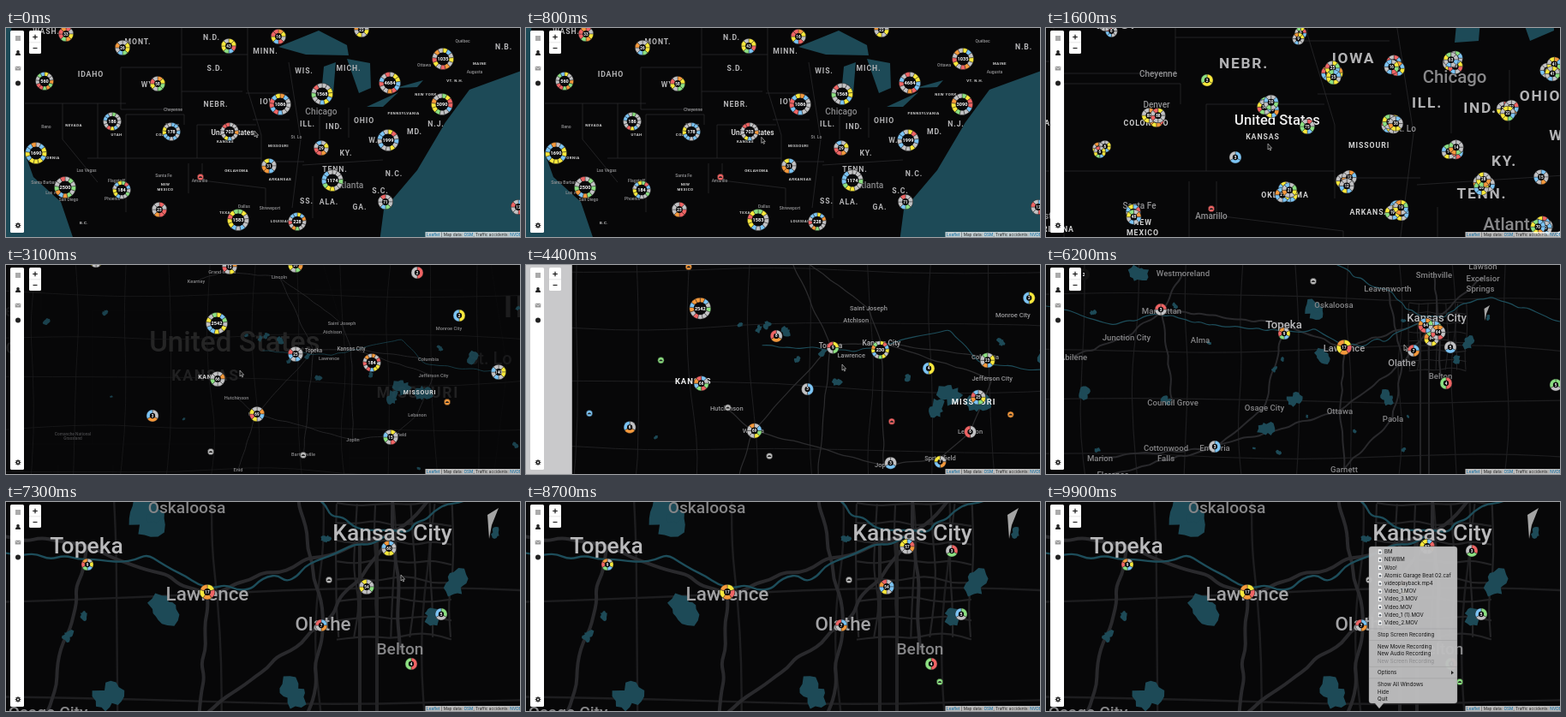
An HTML page for the animation above (10 s loop, 600 by 244 pixels).

```html
<!DOCTYPE html>
<html lang="en">
<head>
<meta charset="utf-8">
<title>Accident map zoom</title>
<style>
  html, body { margin: 0; width: 100%; height: 100%; overflow: hidden; background: #070708; }
  svg { display: block; width: 100vw; height: 100vh; }
  text { font-family: Roboto, "Open Sans", sans-serif; font-weight: 500; }
  .label, .count { text-anchor: middle; dominant-baseline: central; }
  .caps { font-weight: 700; letter-spacing: .1em; }
  .border { fill: none; stroke: #29292b; stroke-width: .8; vector-effect: non-scaling-stroke; }
  .water { fill: #1d4a57; }
  .line { fill: none; stroke-linejoin: round; stroke-linecap: round; }
  .count { fill: #fff; font-weight: 700; }
  .ui text { font-family: Inter, "Liberation Sans", sans-serif; font-weight: 400; }
</style>
</head>
<body>
<svg id="stage" viewBox="0 0 600 244" preserveAspectRatio="none"></svg>
<script>
const LOOP = 10000, ZOOM_MS = 250;
const stage = document.getElementById('stage');
const zooms = [
  { t: 1230, x: 259, y: 137 }, { t: 2630, x: 273, y: 125 }, { t: 4353, x: 369, y: 118 },
  { t: 5730, x: 418, y: 95 }, { t: 6930, x: 461, y: 87 }
];
const palette = { g: '#c2c2c4', r: '#ef6464', o: '#f5993c', y: '#f8e83c', n: '#8ce082', b: '#7cc4f4', k: '#bbb' };
const riverColor = '#1d4d5a';

function el(parent, name, attrs = {}, text) {
  const node = document.createElementNS('http://www.w3.org/2000/svg', name);
  for (const key in attrs) node.setAttribute(key, attrs[key]);
  if (text !== undefined) node.textContent = text;
  parent.appendChild(node);
  return node;
}
const clamp = v => Math.max(0, Math.min(1, v));
const fade = (t, start, ms) => clamp((t - start) / ms);
const rows = list => list.trim().split('|').map(row => row.trim().split(' '));
const range = n => Array.from({ length: n }, (_, i) => i);
function seeded(seed) {
  return () => {
    seed = (seed * 1664525 + 1013904223) >>> 0;
    return seed / 4294967296;
  };
}

// Camera: every zoom doubles the scale around the pointer
function camera(progress) {
  let k = 1, x = 0, y = 0;
  zooms.forEach((z, i) => {
    const s = 1 + progress(z, i);
    k *= s;
    x = z.x + (x - z.x) * s;
    y = z.y + (y - z.y) * s;
  });
  return { k, x, y };
}
const levels = range(6).map(n => camera((z, i) => i < n ? 1 : 0));
function viewFrom(cam, level) {
  const base = levels[level], k = cam.k / base.k;
  return { k, x: cam.x - k * base.x, y: cam.y - k * base.y };
}

// A map layer has its ground below and its place names on top
function makeLayer(level) {
  const root = el(stage, 'g');
  return { level, root, ground: el(root, 'g'), names: el(root, 'g'), places: {} };
}
function labels(layer, size, fill, list, caps) {
  for (const [x, y, ...words] of rows(list)) {
    const name = words.join(' ');
    layer.places[name] = [+x, +y];
    el(layer.names, 'text', { x, y, fill, 'font-size': size, class: caps ? 'label caps' : 'label' }, name);
  }
}
function drawLine(layer, points, stroke, width) {
  const middle = points.slice(1, -1).map((p, i) => {
    const next = points[i + 2];
    return `Q${p} ${(p[0] + next[0]) / 2},${(p[1] + next[1]) / 2}`;
  });
  const d = `M${points[0]}${middle.join('')}L${points[points.length - 1]}`;
  el(layer.ground, 'path', { d, class: 'line', stroke, 'stroke-width': width });
}
// Splits each leg of a line and sways the new points sideways
function meander(points, sway, seed) {
  const rnd = seeded(seed), out = [];
  points.slice(1).forEach((b, i) => {
    const a = points[i], length = Math.hypot(b[0] - a[0], b[1] - a[1]), parts = Math.ceil(length / 9);
    for (let n = 0; n < parts; n++) {
      const p = n / parts, side = n ? (rnd() - .5) * 2 * sway : 0;
      out.push([a[0] + (b[0] - a[0]) * p - (b[1] - a[1]) / length * side, a[1] + (b[1] - a[1]) * p + (b[0] - a[0]) / length * side]);
    }
  });
  return [...out, points[points.length - 1]];
}
function river(layer, width, list) {
  const points = list.split(' ').map(p => p.split(',').map(Number));
  drawLine(layer, meander(points, width * 2, points.length), riverColor, width);
}
function highways(layer, width, color, list) {
  list.split('|').forEach((route, i) => {
    const stops = route.trim().split(' > ').map(name => layer.places[name]);
    drawLine(layer, meander(stops, width, i + 9), color, width);
  });
}
function roadGrid(layer, { x, y, w, h, step, jitter, width, color }) {
  const rnd = seeded(step * 31), wobble = () => (rnd() - .5) * 2 * jitter;
  for (let a = 0; a <= w; a += step) {
    drawLine(layer, range(5).map(i => [x + a + wobble(), y + h * i / 4]), color, width);
  }
  for (let a = 0; a <= h; a += step) {
    drawLine(layer, range(7).map(i => [x + w * i / 6, y + a + wobble()]), color, width);
  }
}
function lake(layer, x, y, size, rnd) {
  const lean = rnd() * Math.PI;
  const points = range(18).map(i => {
    const a = i / 18 * Math.PI * 2, r = size * (.3 + .45 * Math.abs(Math.cos(a - lean)) + rnd() * .4);
    return `${(x + Math.cos(a) * r).toFixed(1)},${(y + Math.sin(a) * r).toFixed(1)}`;
  });
  el(layer.ground, 'polygon', { points: points.join(' '), class: 'water' });
}
function lakes(layer, main, specks, seed) {
  const rnd = seeded(seed);
  rows(main).forEach(([x, y, size]) => lake(layer, +x, +y, +size, rnd));
  range(specks).forEach(() => lake(layer, rnd() * 600, 40 + rnd() * 200, 1.5 + rnd() * 3, rnd));
}

el(stage, 'rect', { width: 600, height: 244, fill: '#070708' });
const country = makeLayer(0), region = makeLayer(2), metro = makeLayer(4);

// Country: oceans, great lakes, state borders
[
  'M-40,-10H6L9,110L32,174L64,203L80,250H-40Z',
  'M640,36L541,72L513,110L480,166L441,212L436,250H640Z',
  'M318,22L365,3L398,20L400,32L350,31Z',
  'M371,45L385,40L382,76L368,77Z',
  'M398,36L425,41L426,70L412,76Z',
  'M421,92L458,75L440,92Z M455,70L487,61L480,69Z'
].forEach(d => el(country.ground, 'path', { d, class: 'water' }));
el(country.ground, 'path', { class: 'border', d:
  'M22,88H140M95,152H298M140,101V215M223,113V152M223,113H292M140,101H208V113M134,46H205V95H134ZM205,0V46' +
  'M205,31H282M205,74H276M107,88V152M66,88V130L107,180M298,125V168M298,156H348M213,158V193M229,158V178L303,187V210' +
  'M282,0V72L298,125M280,76H330M288,107H331M330,40L344,130L334,210M366,96V130M400,93V128M346,160L440,154M358,173V222' });
labels(country, 8.7, '#b3b3b5', `47 4 WASH.|154 16 MONT.|240 11 N.D.|244 47 S.D.|303 27 MINN.|348 50 WIS.|400 47 MICH.
  |99 54 IDAHO|170 66 WYO.|245 89 NEBR.|309 86 IOWA|352 112 ILL.|383 115 IND.|418 108 OHIO|397 146 KY.|384 165 TENN.
  |437 131 W.VA.|477 121 MD.|502 112 N.J.|453 170 N.C.|437 190 S.C.|413 209 GA.|377 203 ALA.|351 202 SS.|581 22 N.B.`, true);
labels(country, 4.4, '#d0d0d0', `79 113 NEVADA|129 124 UTAH|48 151 CALIFORNIA|188 124 COLORADO|256 132 KANSAS|318 137 MISSOURI
  |269 166 OKLAHOMA|320 176 ARKANSAS|186 182 NEW|186 188 MEXICO|257 215 TEXAS|322 225 LOUISIANA|91 227 B.C.
  |490 77 NEW YORK|553 41 MAINE|524 61 VT. N.H.|464 99 PENNSYLVANIA|135 186 ARIZONA`, true);
labels(country, 5, '#929294', `47 115 Reno|94 166 Las Vegas|45 180 Santa Barbara|60 192 Los Angeles|73 200 San Diego|129 178 Flagstaff
  |124 199 Phoenix|184 172 Santa Fe|226 178 Amarillo|278 208 Dallas|308 210 Shreveport|195 95 Cheyenne|194 113 Denver
  |339 127 St. Lo|533 15 Québec|488 43 Ottawa|547 51 Augusta`);
labels(country, 10.2, '#88888a', '368 97 Chicago|401 183 Atlanta');
labels(country, 8.3, '#f0f0f0', '264.5 122 United States');

// Region
labels(region, 5.6, '#98989a', `222 19 Kearney|252 8 Grand Island|319 14 Lincoln|392 68 Saint Joseph|381 78 Atchison|377 109 Lawrence
  |517 74 Monroe City|493 110 Columbia|499 129 Jefferson City|480 175 Lebanon|405 204 Joplin|269 155 Hutchinson|292 174 Wichita
  |347 221 Bartlesville|271 239 Enid|454 198 Springfield`);
labels(region, 6.3, '#b0b0b2', '359 100 Topeka|403 98 Kansas City');
labels(region, 4.8, '#505052', '78 197 Comanche National|78 202 Grassland');
labels(region, 7, '#f0f0f0', '240 131 KANSAS|483 149 MISSOURI', true);
roadGrid(region, { x: -20, y: -20, w: 660, h: 290, step: 52, jitter: 7, width: .7, color: '#202022' });
highways(region, .9, '#2c2c2e', `Kearney > Grand Island > Lincoln > Saint Joseph > Kansas City > Joplin|Topeka > Kansas City > Columbia
  |Kansas City > Jefferson City > Lebanon > Springfield > Joplin > Wichita > Hutchinson|Topeka > Wichita > Enid|Lincoln > Topeka > Bartlesville`);
river(region, .8, '300,100 338,102 380,106 403,99 462,86 490,116 575,125');
lakes(region, '320 88 5|352 106 4|462 143 12|487 150 12|450 155 9|545 108 8|365 132 5', 14, 8);
const blank = el(region.root, 'rect', { x: -400, y: -300, width: 535, height: 900, fill: '#c9c9cb' });

// Metro
labels(metro, 13.2, '#b9b9bb', '277.5 69 Topeka|456 61.5 Kansas City');
labels(metro, 11.2, '#a3a3a5', '348 97 Lawrence|415.5 114.5 Olathe');
labels(metro, 9.6, '#858587', `135 53 Manhattan|94 84 Junction City|180 87 Alma|160 9 Westmoreland|336 46.5 Oskaloosa|399 27 Leavenworth
  |453 11 Smithville|510 1 Lawson|510 15 Excelsior|507 27 Springs|32 107 Abilene|148 160 Council Grove|255 166 Osage City
  |343 170 Ottawa|405 179 Paola|460.5 129 Belton|197 213 Emporia|63 225 Marion|140 213 Cottonwood|140 225 Falls|348 238 Garnett|78 244 Florence`);
roadGrid(metro, { x: -20, y: -25, w: 660, h: 290, step: 62, jitter: 6, width: 1.2, color: '#1d1d1f' });
roadGrid(metro, { x: 424, y: 45, w: 66, h: 77, step: 11, jitter: 2, width: 1.1, color: '#232325' });
highways(metro, 2, '#29292c', `Abilene > Junction City > Manhattan > Topeka > Lawrence > Kansas City|Topeka > Osage City > Emporia > Florence
  |Kansas City > Olathe > Ottawa > Emporia > Marion|Kansas City > Belton|Olathe > Paola > Garnett|Lawrence > Ottawa > Garnett
  |Smithville > Kansas City > Excelsior|Westmoreland > Manhattan > Council Grove|Leavenworth > Olathe`);
for (const x of [437, 447]) drawLine(metro, [[x, 65], [x, 250]], '#232325', 2);
river(metro, 1.2, '0,48 80,70 130,57 205,72 290,78 313,74 351,94 374,94 383,87 394,90 411,78 451,64');
river(metro, 1.2, '340,0 380,25 405,32 420,52 447,60 466,61 480,49 520,37 600,66');
lakes(metro, '313 53 14|323 106 11|290 157 10|398 155 10|493 91 9|258 191 11|108 10 13|45 150 9|140 158 7|479 110 6', 16, 21);
el(metro.ground, 'path', { d: 'M511.5,51L518,47L514,57L512.5,65Z', fill: '#a5a5a5' });

// Cluster markers: the size follows the count, a zero count is a plain dot
const markerLayer = el(stage, 'g');
function radiusFor(count) {
  if (count >= 1000) return 12.5;
  if (count >= 150) return 10.5;
  return count >= 10 ? 8.7 : count ? 7 : 3.7;
}
function drawMarker(parent, count, colors, rnd) {
  const g = el(parent, 'g'), r = radiusFor(count);
  if (!count) {
    el(g, 'circle', { r, fill: palette[colors], stroke: '#111', 'stroke-width': .5 });
    el(g, 'path', { d: 'M-2.4,1L-1,-.8H1L2.4,1Z', fill: '#222' });
    return g;
  }
  const keys = colors || range(r > 9 ? 13 : 8).map(() => 'gggyobrnggby'[Math.floor(rnd() * 12)]).join('');
  const at = n => {
    const a = n / keys.length * Math.PI * 2 - Math.PI / 2;
    return [r * Math.cos(a), r * Math.sin(a)];
  };
  el(g, 'circle', { r, fill: '#111' });
  [...keys].forEach((key, i) =>
    el(g, 'path', { d: `M0,0L${at(i)}A${r},${r} 0 0 1 ${at(i + 1)}Z`, fill: palette[key], stroke: '#222', 'stroke-width': .4 }));
  el(g, 'circle', { r: r * (r > 9 ? .6 : .45), fill: '#09090b' });
  el(g, 'text', { class: 'count', 'font-size': r > 9 ? 5.6 : 4.6 }, count);
  return g;
}
// Rows: x y count [colors]; a count such as 25*3 is a cluster splitting in three
function markerSet(level, from, to, list) {
  const group = el(markerLayer, 'g'), rnd = seeded(level * 991 + from), items = [];
  for (const [x, y, amount, colors] of rows(list)) {
    const [count, copies = 1] = amount.split('*').map(Number), turn = rnd() * 6.3;
    range(copies).forEach(i => {
      const reach = copies > 1 ? 2 + rnd() * 5 : 0;
      items.push({ x: +x, y: +y, dx: Math.cos(turn + i * 2.4) * reach, dy: Math.sin(turn + i * 2.4) * reach,
        node: drawMarker(group, count, colors, rnd) });
    });
  }
  return { level, from, to, group, items };
}
const plains = '246 68 2542|247 133 66|293 174 69|515 160 0 o|';
const suburbs = '278 80 9 gybnro|348 96 17 yroyo|467 138 4 rn|';
const kansasSide = suburbs + '414.5 115.5 7 bogr|484.5 109 5 ngb|441 93 54|419 89 0 k|';
const markerSets = [
  markerSet(0, 0, 1480, `45 62 560|70 7 33|136 23 26|177 65 58|124 109 186|193 121 178|35 146 1690|69 186 2500|135 189 184|179 212 23
    |261 121 703|227 174 0 r|260 21 43|318 10 16|415 2 22|320 89 1086|369 77 1568|448 64 4684|510 36 1035|509 89 3090|446 131 1999
    |368 140 29|307 161 31|381 178 1174|443 203 71|271 224 1583|340 226 228|598 209 12`),
  markerSet(1, 1480, 2880, `75 0 8*2|295 8 9*2|333 51 25*4|407 45 16*3|476 39 63*4|590 48 41*4|188 61 2 yyn|127 104 88*3|64 141 6*3
    |258 92 30*4|305 115 75|221 151 3 bbg|405 112 38*5|540 95 22*4|476 143 14*3|511 183 28*4|578 174 15|351 178 12*3|282 193 21*4
    |101 218 48*2|193 211 0 r|411 214 19*4|580 232 70*5`),
  markerSet(2, 2880, 3300, plains + `105 -4 5|261 2 12|338 0 31|480 9 2 rg|529 59 2 yb|338 104 25|427 114 184|575 125 140
    |171 176 3 gob|449 201 15|239 218 0 k|347 222 0 k`),
  markerSet(2, 3300, 5980, plains + `236 32 0 o|312 92 8 gor|361 102 9 yngr|402 104 230|531 59 2 yb|444 120 4 yb|495 113 23|212 113 0 n
    |270 154 0 k|150 159 0 b|185 171 6 gob|339 138 3 bg|487 145 25|412 166 0 r|480 175 6 gr|411 202 3 gbg|454 201 7 goby|306 196 0 k`),
  markerSet(4, 5980, 7180, suburbs + '44 11 2 o|134 52 3 rggr|429 100 7 bogr|472 96 5 gbg|450 78 64*4|197 212 3 bg|595 140 5 ngn|312 19 0 k'),
  markerSet(4, 7180, 7500, kansasSide + '454 70.5 60'),
  markerSet(4, 7500, LOOP, kansasSide + '453 69.5 57|479 72 3 rng|472 148.5 0 n')
];

// Interface
const ui = el(stage, 'g', { class: 'ui' });
const box = (x, y, width, height, fill, rx = 0) => el(ui, 'rect', { x, y, width, height, fill, rx });
const stroke = (parent, d, color, width) => el(parent, 'path', { d, fill: 'none', stroke: color, 'stroke-width': width });
const disc = (cy, r) => el(ui, 'circle', { cx: 14, cy, r, fill: '#222' });
box(5, 3, 16, 236, '#fff', 1.5);
stroke(ui, 'M11,10H17M11,12H17M11,14H17', '#444', .9);
el(ui, 'path', { d: 'M11,32Q11,28.5 14,29Q17,28.5 17,32Z', fill: '#222' });
disc(27.8, 1.8);
box(10.7, 44.8, 6.6, 4.8, '#999', .6);
stroke(ui, 'M11,45.5L14,47.6L17,45.5', '#fff', .6);
disc(64.5, 3);
range(8).forEach(i => el(ui, 'rect', { x: 13.4, y: 227.2, width: 1.2, height: 2, fill: '#222', transform: `rotate(${i * 45} 14 230.5)` }));
disc(230.5, 2.4);
disc(230.5, 1).setAttribute('fill', '#fff');
box(27, 3, 14, 27, '#fff', 1.5);
stroke(ui, 'M27,16.8H41', '#ccc', .5);
stroke(ui, 'M31.2,10.5H36.8M34,7.7V13.3M31.5,23.5H36.5', '#111', 1.2);
box(489.5, 238, 110.5, 6, 'rgba(255,255,255,.72)');
const credit = el(ui, 'text', { x: 491, y: 242.8, 'font-size': 4.75 });
['Leaflet', ' | Map data: ', 'OSM', ', Traffic accidents: ', 'NVDB'].forEach((text, i) =>
  el(credit, 'tspan', { fill: i % 2 ? '#222' : '#0066a0' }, text));

// Dock menu: files, then command groups split by rules
const menu = el(ui, 'g');
el(menu, 'path', { d: 'M380,52H477Q480,52 480,55V232Q480,235 477,235H394L389,241L384,235H380Q377,235 377,232V55Q377,52 380,52Z',
  fill: '#bfbfc0', 'fill-opacity': .96, stroke: '#888', 'stroke-width': .4 });
const files = ['BM', 'NEWBM', 'Woo!', 'Atomic Garage Beat 02.caf', 'videoplayback.mp4', 'Video_1.MOV', 'Video_3.MOV', 'Video.MOV', 'Video_1 (1).MOV', 'Video_2.MOV'];
const commands = [['Stop Screen Recording'], ['New Movie Recording', 'New Audio Recording', 'New Screen Recording'],
  ['Options'], ['Show All Windows', 'Hide', 'Quit']];
let menuY = 58;
function menuRow(x, text, step) {
  const fill = text === 'New Screen Recording' ? '#8c8c8e' : '#111';
  el(menu, 'text', { x, y: menuY + 2.2, 'font-size': 6.1, fill }, text);
  if (text === 'Options') el(menu, 'path', { d: `M473,${menuY - 2.2}l3,2.2l-3,2.2Z`, fill: '#222' });
  menuY += step;
}
files.forEach(name => {
  el(menu, 'path', { d: `M387.5,${menuY - 3}h3.2l1.6,1.6v4.6h-4.8Z`, fill: '#f5f5f5', stroke: '#888', 'stroke-width': .3 });
  el(menu, 'circle', { cx: 390, cy: menuY + .6, r: 1.2, fill: '#56606c' });
  menuRow(395, name, 9.2);
});
commands.forEach(group => {
  menuY -= 2;
  stroke(menu, `M377,${menuY}H480`, '#a2a2a4', .7);
  menuY += 6.8;
  group.forEach(name => menuRow(387, name, 8.7));
});

// The pointer rests at each zoom centre, then leaves for the dock
const pointer = el(stage, 'path', { d: 'M0,-2V5L1.6,3.6L2.7,6L3.7,5.5L2.6,3.2H4.6Z', fill: '#111', stroke: '#ddd', 'stroke-width': .6 });
const pointerStops = [{ t: 0, x: 290, y: 122 }, ...zooms, { t: 8900, x: 389, y: 252 }];
function pointerAt(t) {
  const i = Math.max(0, pointerStops.findLastIndex(stop => stop.t <= t));
  const a = pointerStops[i], b = pointerStops[i + 1] || a;
  const p = fade(t, a.t + 480, Math.max(1, b.t - a.t - 580)), e = p * p * (3 - 2 * p);
  return [a.x + (b.x - a.x) * e, a.y + (b.y - a.y) * e];
}

function show(node, visible) { node.style.display = visible ? '' : 'none'; }
function placeLayer({ root, level }, cam, opacity) {
  const v = viewFrom(cam, level);
  root.setAttribute('transform', `translate(${v.x} ${v.y}) scale(${v.k})`);
  root.setAttribute('opacity', opacity);
  show(root, opacity > 0);
}
function render(t) {
  const cam = camera(z => 1 - (1 - fade(t, z.t, ZOOM_MS)) ** 2);
  const toRegion = fade(t, 2900, 230), toMetro = fade(t, 4750, 230);
  placeLayer(country, cam, 1 - toRegion);
  placeLayer(region, cam, toRegion * (1 - toMetro));
  placeLayer(metro, cam, toMetro);
  show(blank, t > zooms[2].t && t < zooms[2].t + ZOOM_MS);
  for (const set of markerSets) {
    const active = t >= set.from && t < set.to;
    show(set.group, active);
    if (!active) continue;
    const v = viewFrom(cam, set.level), spread = Math.min(4, (t - set.from) / 120);
    for (const m of set.items) {
      m.node.setAttribute('transform', `translate(${m.x * v.k + v.x + m.dx * spread} ${m.y * v.k + v.y + m.dy * spread})`);
    }
  }
  show(menu, t >= 9100);
  pointer.setAttribute('transform', `translate(${pointerAt(t)})`);
}

const start = performance.now();
function tick() {
  render((performance.now() - start) % LOOP);
  requestAnimationFrame(tick);
}
tick();
</script>
</body>
</html>
```
